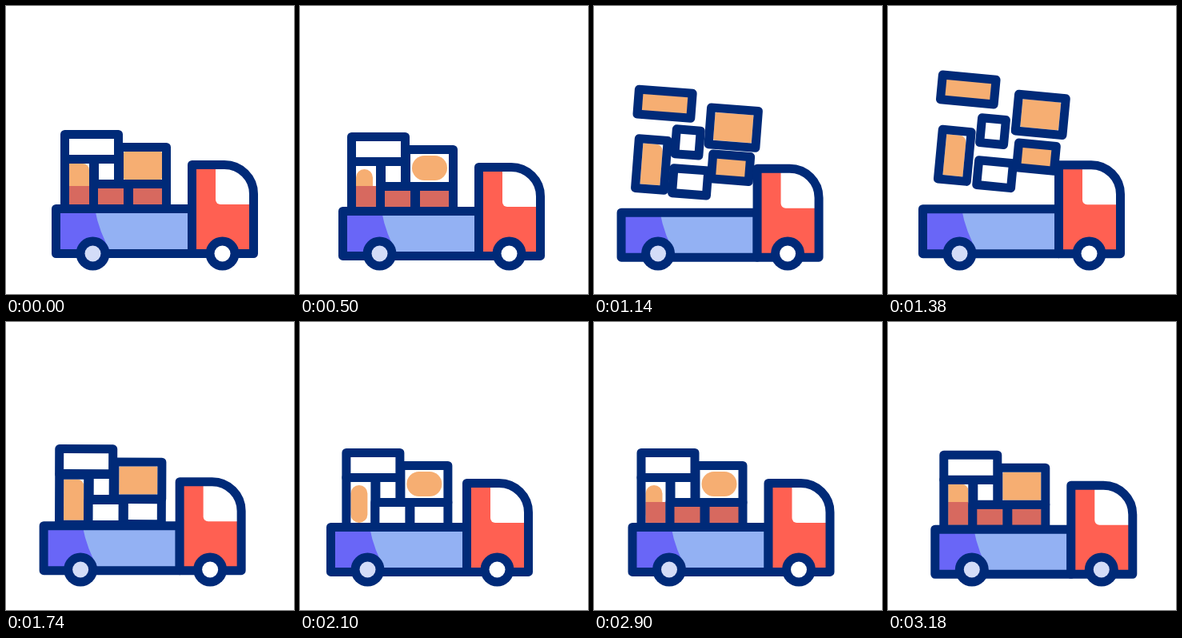
An HTML page with a canvas that plays this animation: 360 by 360 pixels, repeating every 3.2 s.

```html
<!DOCTYPE html>
<html lang="en">
<head>
<meta charset="utf-8">
<title>Delivery truck</title>
<style>
  html, body { margin: 0; width: 100%; height: 100%; overflow: hidden; background: #fff; }
  canvas { display: block; width: 360px; height: 360px; }
</style>
</head>
<body>
<canvas id="stage"></canvas>
<script>
const LOOP = 3200, HOLD = 200, STEP = 20;
const NAVY = '#002a78', ORANGE = '#f6ae72', BRICK = '#d7695f', RED = '#ff6052',
      PURPLE = '#6966f7', BLUE = '#93b1f3', WHITE = '#fff', PALE = '#d3dcf8';

const canvas = document.getElementById('stage');
const ctx = canvas.getContext('2d');
const dpr = window.devicePixelRatio || 1;
canvas.width = canvas.height = 360 * dpr;

// Horizontal drift of the truck: [step, offset]
const DRIFT = [[0, 0], [15, -9], [27, -21.5], [35, -27.5], [44, -29.8], [54, -23], [59, -19],
               [70, -14], [81, -17], [95, -24], [108, -30], [121, -25], [135, -14.5],
               [149, -3.7], [160, 0]];

// Outline of each box at rest, and how far it is tossed
const BOXES = [
  { id: 'tall',  x: 73.5,  y: 191.5, w: 36, h: 62, dx: 11, dy: -36.5 },
  { id: 'low',   x: 109.5, y: 222.5, w: 43, h: 31, dx: 22, dy: -28.5 },
  { id: 'right', x: 153.5, y: 222.5, w: 47, h: 31, dx: 28, dy: -50.5 },
  { id: 'small', x: 110.5, y: 191.5, w: 30, h: 31, dx: 25, dy: -51.5 },
  { id: 'big',   x: 141.5, y: 176.5, w: 59, h: 46, dx: 39.5, dy: -65 },
  { id: 'top',   x: 73.5,  y: 160.5, w: 67, h: 31, dx: 12.5, dy: -73 }
];

const ease = t => (1 - Math.cos(Math.PI * Math.min(1, Math.max(0, t)))) / 2;
const isLoaded = n => n < 28 || n >= 105;

// Smooth curve through points
function curve(points, n) {
  const last = points.length - 1;
  const slope = i => i === 0 || i === last ? 0
    : (points[i + 1][1] - points[i - 1][1]) / (points[i + 1][0] - points[i - 1][0]);
  let i = 0;
  while (i < last - 1 && n >= points[i + 1][0]) i++;
  const [n0, a] = points[i], [n1, b] = points[i + 1];
  const d = n1 - n0, t = (n - n0) / d, s = 1 - t;
  return s * s * (1 + 2 * t) * a + t * t * (3 - 2 * t) * b
    + d * t * s * (s * slope(i) - t * slope(i + 1));
}

function rect(x, y, w, h, fill, radii = 0) {
  ctx.beginPath();
  ctx.roundRect(x, y, w, h, radii);
  ctx.fillStyle = fill;
  ctx.fill();
}

function disc(x, y, r, fill) {
  ctx.beginPath();
  ctx.arc(x, y, r, 0, 2 * Math.PI);
  ctx.fillStyle = fill;
  ctx.fill();
}

function boxFill(id, n) {
  switch (id) {
    case 'top': return n >= 45 && n < 74 ? ORANGE : WHITE;
    case 'low': return isLoaded(n) ? BRICK : n < 47 ? ORANGE : WHITE;
    case 'right': return isLoaded(n) ? BRICK : n >= 47 && n < 74 ? ORANGE : WHITE;
    case 'small': return WHITE;
    default: return ORANGE;
  }
}

function drawBox(box, n, toss, worn, bob) {
  const { id, x, y, w, h } = box;
  const fill = boxFill(id, n);
  ctx.save();
  ctx.translate(x + w / 2 + box.dx * toss, y + h / 2 + box.dy * toss);
  ctx.rotate(toss * 5.5 * Math.PI / 180);
  ctx.translate(-w / 2, -h / 2);
  rect(0, 0, w, h, WHITE);
  const iw = w - 11, ih = h - 11;
  if (id === 'tall') {
    const r = 11 * worn, cut = 4 * worn;
    rect(5.5, 5.5 + cut, iw - cut, ih - cut, fill, [r, Math.max(r, 8), r, r]);
    // The shade line keeps its height on the stage while the box bobs
    if (isLoaded(n)) rect(5.5, 33.5 - bob, iw, 23 + bob, BRICK);
  } else if (id === 'big') {
    const cut = 2 * worn;
    rect(5.5 + cut, 5.5 + cut, iw - 2 * cut, ih - 2 * cut, fill, 2 + 14 * worn);
  } else {
    rect(5, 5, iw + 1, ih + 1, fill);
  }
  ctx.strokeRect(0, 0, w, h);
  ctx.restore();
}

function drawBody() {
  // Bed
  rect(62.5, 253.5, 170, 56, BLUE);
  ctx.beginPath();
  ctx.moveTo(62.5, 253.5);
  ctx.lineTo(111, 253.5);
  ctx.quadraticCurveTo(116, 282, 132, 309.5);
  ctx.lineTo(62.5, 309.5);
  ctx.fillStyle = PURPLE;
  ctx.fill();
  ctx.strokeRect(62.5, 253.5, 170, 56);

  // Cab
  const cab = new Path2D('M232.5 309.5V198.5H273A36.5 36.5 0 0 1 309.5 235V309.5Z');
  ctx.fillStyle = RED;
  ctx.fill(cab);
  ctx.save();
  ctx.clip(cab);
  rect(262, 190, 60, 58, WHITE, [0, 0, 0, 6]);
  ctx.restore();
  ctx.stroke(cab);
}

function draw(n) {
  const phase = n * Math.PI / 10;
  const bob = 2.95 * (1 - Math.cos(phase));
  const toss = n < 57 ? ease((n - 23) / 34) : ease((80 - n) / 23);
  // Boxes land off their place, then slide back
  const slide = 8.5 * (ease((n - 60) / 20) - ease((n - 94) / 14));
  const worn = toss > 0.02 ? 0 : Math.max(0, -Math.sin(phase));

  ctx.setTransform(dpr, 0, 0, dpr, 0, 0);
  rect(0, 0, 360, 360, WHITE);
  ctx.translate(curve(DRIFT, n), 0);
  ctx.strokeStyle = NAVY;
  ctx.lineWidth = 11;
  ctx.lineJoin = 'round';

  ctx.save();
  ctx.translate(slide, bob);
  BOXES.forEach(box => drawBox(box, n, toss, worn, bob));
  ctx.translate(-slide, 0);
  drawBody();
  ctx.restore();

  disc(108.5, 309.5, 21, NAVY);
  disc(108.5, 309.5, 10, PALE);
  disc(270.5, 309.5, 21, NAVY);
  disc(270.5, 309.5, 10, n < 140 ? WHITE : PALE);
}

function tick() {
  const t = performance.now() % LOOP;
  draw(Math.max(0, Math.floor((t - HOLD) / STEP)));
  requestAnimationFrame(tick);
}
tick();
</script>
</body>
</html>
```
